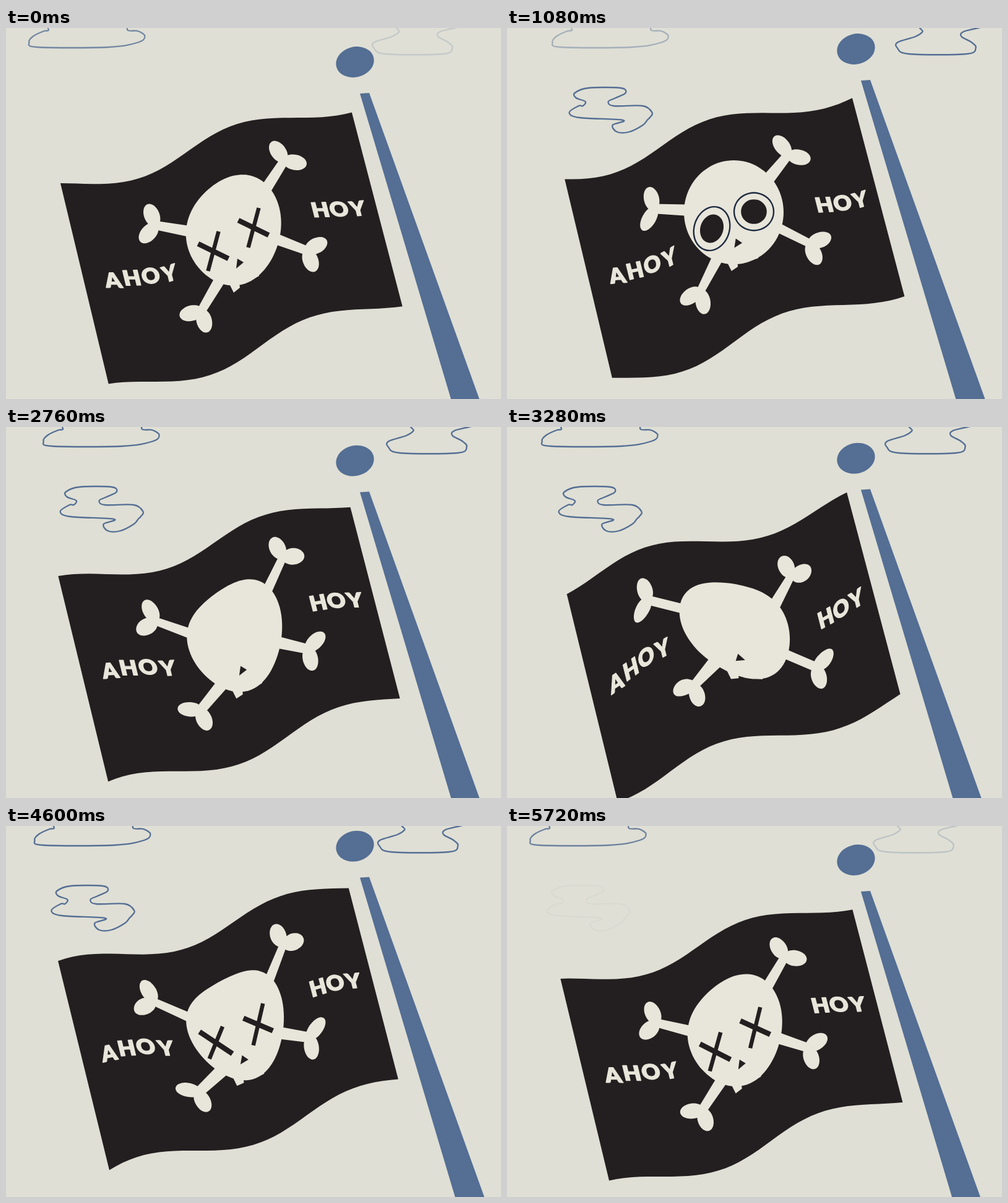
An HTML page with a canvas that plays this animation: 800 px wide and 600 px high, repeating every 5760 ms.

```html
<!DOCTYPE html>
<html lang="en">
<head>
<meta charset="utf-8">
<title>Pirate flag</title>
<style>
html, body { margin: 0; height: 100%; overflow: hidden; background: #dfdfd5; }
canvas { display: block; }
</style>
</head>
<body>
<canvas id="stage" width="800" height="600"></canvas>
<script>
const ctx = document.getElementById('stage').getContext('2d');
const LOOP = 5760, STEP = 40, TAU = Math.PI * 2, RAD = TAU / 360;
const PAPER = '#dfdfd5', BLUE = '#546e94', INK = '#231f20', BONE = '#e8e5da', RING = '#1d2a40';
const COS = Math.cos(14 * RAD), SIN = Math.sin(14 * RAD);

const clamp = x => Math.max(0, Math.min(1, x));
const mix = (a, b, k) => a.map((x, i) => x + (b[i] - x) * k);
const bob = t => 12.3 * Math.cos(TAU * t / 2880);
const ripple = (u, v, t) =>
  (20 - 4 * u ** 3) * Math.cos(TAU * (t / 960 - .32 - .1 * v + 1.29 * u));

// Cloth coordinates (u, v in 0..1) to the screen, and back again
function wave([u, v], t) {
  const d = ripple(u, v, t);
  const x = 28.5 - 2 * v + u * (482 + 6 * v) + .11 * d;
  const y = 261.5 + 342.5 * v - u * (21.5 + 13.5 * v) + d;
  return [COS * x + SIN * y, COS * y - SIN * x + bob(t)];
}
function flatten([sx, sy], t = 0) {
  sy -= bob(t);
  const x = COS * sx - SIN * sy, y = SIN * sx + COS * sy;
  let u = .5, v = .5;
  for (let i = 0; i < 14; i++) {
    const d = ripple(u, v, t);
    u = (x - .11 * d - 28.5 + 2 * v) / (482 + 6 * v);
    v = (y - d - 261.5 + 21.5 * u) / (342.5 - 13.5 * u);
  }
  return [u, v];
}
const cloth = (pts, t) => pts.map(p => flatten(p, t));

function oval(x, y, rx, ry, angle = 0) {
  const c = Math.cos(angle), s = Math.sin(angle);
  return Array.from({ length: 24 }, (_, i) => {
    const p = rx * Math.cos(i * TAU / 24), q = ry * Math.sin(i * TAU / 24);
    return [x + p * c - q * s, y + p * s + q * c];
  });
}

function polygon(pts) {
  ctx.beginPath();
  pts.forEach(p => ctx.lineTo(...p));
  ctx.closePath();
}
// Closed Catmull-Rom curve through the points
function curve(pts) {
  const at = i => pts[(i + pts.length) % pts.length];
  ctx.beginPath();
  ctx.moveTo(...pts[0]);
  pts.forEach((b, i) => {
    const a = at(i - 1), c = at(i + 1), d = at(i + 2);
    ctx.bezierCurveTo(b[0] + (c[0] - a[0]) / 6, b[1] + (c[1] - a[1]) / 6,
      c[0] - (d[0] - b[0]) / 6, c[1] - (d[1] - b[1]) / 6, ...c);
  });
  ctx.closePath();
}
function fill(color) { ctx.fillStyle = color; ctx.fill(); }
function stroke(color, width) { ctx.strokeStyle = color; ctx.lineWidth = width; ctx.stroke(); }

// A cloud is a stack of spans [y, left, right]; it fades out, jumps back and fades in around its wrap time
const cloud = (wrap, spans) => ({
  wrap,
  pts: [...spans.map(([y, , r]) => [r, y]), ...spans.map(([y, l]) => [l, y]).reverse()],
});
const clouds = [
  cloud(700, [[-4, 108, 212], [4, 97, 226], [5, 90, 242], [13, 73, 253], [23, 66, 243], [31, 80, 194]]),
  cloud(180, [[-4, 666, 761], [6, 664, 730], [14, 652, 727], [23, 624, 743], [32, 623, 750], [42, 642, 735]]),
  cloud(0, [[97, 124, 176], [105, 102, 184], [113, 104, 168], [119, 119, 156], [126, 115, 165],
    [126, 108, 212], [137, 93, 227], [145, 110, 223], [149, 180, 219], [157, 163, 212], [168, 170, 190]]),
];

const ball = oval(564, 55, 31, 24.5, -14 * RAD);
const pole = [[572, 106], [587, 105], [783, 650], [734, 650]];

// A tapered shaft that ends in two knobs, spread to either side of its direction
function bone(x0, y0, x1, y1, spread) {
  const a = Math.atan2(y1 - y0, x1 - x0), nx = -Math.sin(a), ny = Math.cos(a);
  const side = (x, y, w) => [x + nx * w, y + ny * w];
  const tip = [x1 + 4 * Math.cos(a), y1 + 4 * Math.sin(a)];
  const shaft = [side(x0, y0, 9), side(...tip, 7), side(...tip, -7), side(x0, y0, -9)];
  const knobs = [-1, 1].map(s => {
    const b = a + s * spread * RAD;
    return cloth(oval(x1 + 17 * Math.cos(b), y1 + 17 * Math.sin(b), 19.5, 12.5, b));
  });
  return { shaft: cloth(shaft), knobs };
}
const bones = [
  bone(419, 262, 450, 214, 68), bone(297, 329, 242, 319, 58),
  bone(428, 338, 486, 360, 48), bone(345, 408, 316, 457, 45),
];
const EYES_TIME = 1080;
const skull = cloth(oval(366.5, 298, 80.5, 84), EYES_TIME);
const jaw = cloth([[354, 400], [368, 428], [378, 420], [376, 404], [385, 414], [391, 409],
  [390, 397], [398, 407], [409, 401], [406, 380], [385, 372]]);
const nose = cloth([[374, 373], [372, 389], [384, 379]]);
const eyes = [[331, 324.5, 28.5, 36, 18 * RAD], [399, 297, 32, 30.5, 0]];
const crosses = [[335, 361], [400, 323]];

// Letters evenly spaced between the first and the last one
const word = (text, first, last) => [...text].map((c, i) =>
  [c, flatten(mix(first, last, i / (text.length - 1)))]);
const letters = [...word('AHOY', [173, 408], [264, 397]), ...word('HOY', [508, 294], [568, 292])];

function drawClouds(t) {
  for (const { wrap, pts } of clouds) {
    const s = t < wrap ? t + LOOP : t;
    ctx.save();
    ctx.globalAlpha = clamp(Math.min(s - wrap, wrap + LOOP - s) / 900);
    ctx.translate(16 - .00775 * s, 0);
    curve(pts);
    stroke(BLUE, 2.3);
    ctx.restore();
  }
}

function drawPole(t) {
  ctx.save();
  ctx.translate(0, bob(t) - bob(0));
  curve(ball);
  fill(BLUE);
  polygon(pole);
  fill(BLUE);
  ctx.restore();
}

function drawText(t) {
  ctx.font = '900 35px Lato, "Open Sans", sans-serif';
  ctx.textAlign = 'center';
  ctx.lineJoin = 'round';
  ctx.fillStyle = ctx.strokeStyle = BONE;
  ctx.lineWidth = 1.4;
  for (const [c, [u, v]] of letters) {
    const p = wave([u, v], t), a = wave([u + .01, v], t), b = wave([u, v + .01], t);
    ctx.save();
    ctx.transform((a[0] - p[0]) / 4.85, (a[1] - p[1]) / 4.85,
      (b[0] - p[0]) / 3.36, (b[1] - p[1]) / 3.36, ...p);
    ctx.fillText(c, 0, 12.5);
    ctx.strokeText(c, 0, 12.5);
    ctx.restore();
  }
  ctx.lineJoin = 'miter';
}

const pop = (t, from, to) => clamp((t - from) / 120) * clamp((to - t) / 120);

function drawEyes(t, put) {
  const open = pop(t, 600, 2500);
  const dead = pop(t < LOOP / 2 ? t + LOOP : t, 4000, 6300);
  const disc = ([x, y, rx, ry, angle], k) =>
    curve(put(cloth(oval(x, y, rx * k, ry * k, angle), EYES_TIME)));
  if (open) for (const eye of eyes) {
    disc(eye, open);
    stroke(RING, 2.4);
    disc(eye, open * .65);
    fill(INK);
  }
  if (dead) for (const [x, y] of crosses) {
    for (const [dx, dy, width] of [[24.5, 12, 8.5], [8.5, -32, 6.5]]) {
      polygon(put(cloth([-dead, dead].map(k => [x + dx * k, y + dy * k]))));
      stroke(INK, width * dead);
    }
  }
}

function drawFlag(t) {
  const put = pts => pts.map(p => wave(p, t));
  const shape = (path, pts, color) => { path(put(pts)); fill(color); };
  const edge = Array.from({ length: 41 }, (_, i) => [i / 40, 0]);
  shape(polygon, [...edge, ...edge.map(([u]) => [1 - u, 1])], INK);
  for (const { shaft, knobs } of bones) {
    shape(polygon, shaft, BONE);
    knobs.forEach(k => shape(curve, k, BONE));
  }
  shape(curve, skull, BONE);
  shape(polygon, jaw, BONE);
  shape(polygon, nose, INK);
  drawEyes(t, put);
  drawText(t);
}

const start = performance.now();
function frame() {
  const t = Math.floor((performance.now() - start) % LOOP / STEP) * STEP;
  ctx.fillStyle = PAPER;
  ctx.fillRect(0, 0, 800, 600);
  drawClouds(t);
  drawPole(t);
  drawFlag(t);
  requestAnimationFrame(frame);
}
frame();
</script>
</body>
</html>
```
